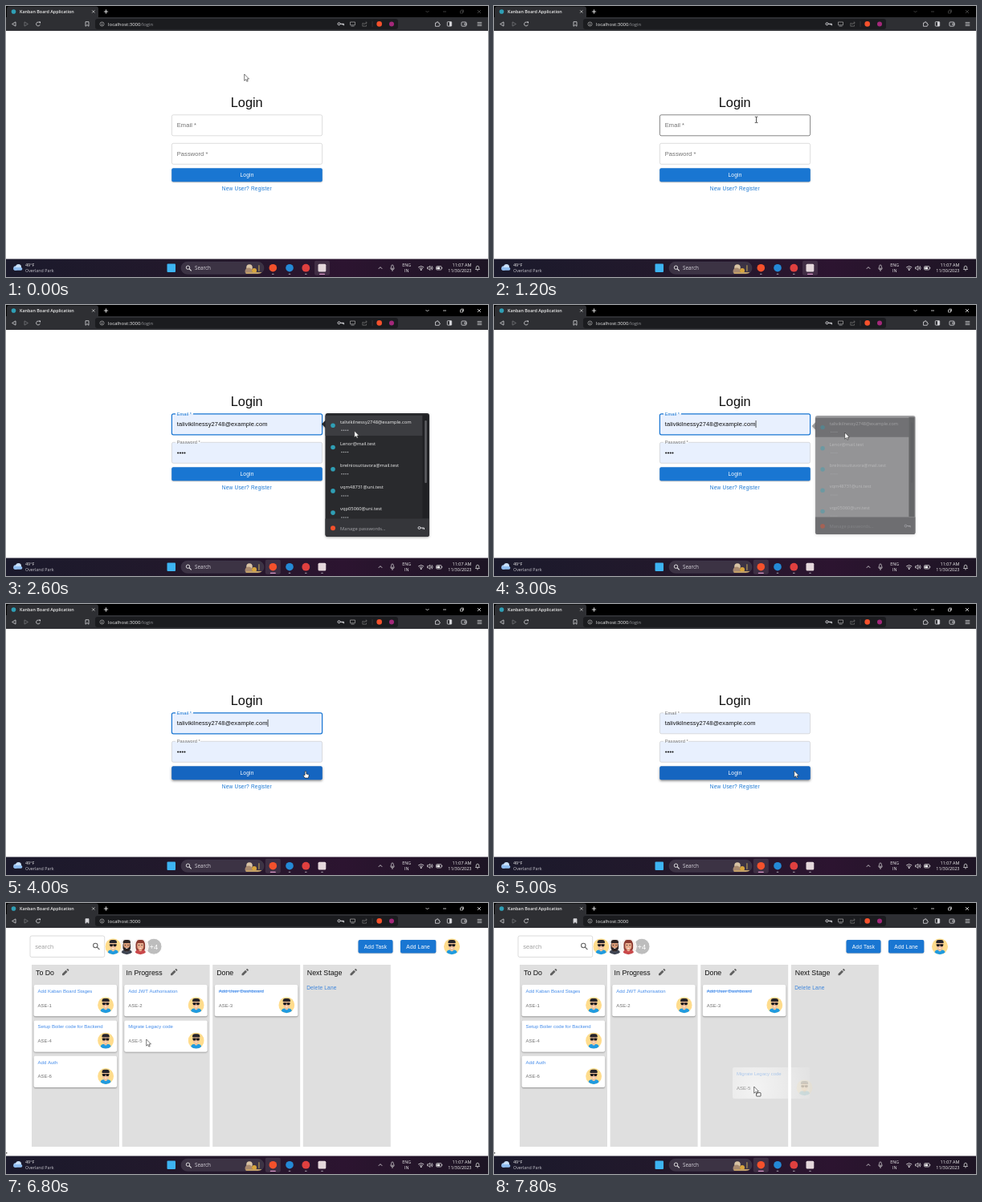
An HTML page with a canvas that plays this animation: 600 by 338 pixels, repeating every 8000 ms.

```html
<!DOCTYPE html>
<html lang="en">
<head>
<meta charset="utf-8">
<title>Kanban Board Application</title>
<style>
html, body { margin: 0; width: 100%; height: 100%; overflow: hidden; background: #fff; }
canvas { display: block; width: 600px; height: 338px; }
</style>
</head>
<body>
<canvas id="stage"></canvas>
<script>
const W = 600, H = 338, LOOP = 8000, STEP = 200;
const canvas = document.getElementById('stage');
const dpr = window.devicePixelRatio || 1;
canvas.width = W * dpr;
canvas.height = H * dpr;
const c = canvas.getContext('2d');

const UI = '"Open Sans", "Noto Sans", sans-serif';
const ARIAL = '"Liberation Sans", Arial, sans-serif';
const BLUE = '#1976d2', ORANGE = '#f4512c', TEAL = '#2f9fb5', LIGHT = '#d6d6da';
const EMAIL = 'talivikilnessy2748@example.com';
const ACCOUNTS = [EMAIL, 'Lenor@mail.test', 'brelniosuttavora@mail.test', 'vqm48731@uni.test', 'vqp05060@uni.test'];

// Moments in the loop, in ms
const FOCUS = 1400, OPEN = 1800, PREVIEW = 2400, FILL = 2800, CLOSED = 3200, SUBMIT = 4800, BOARD = 5200, GRAB = 6800;

// Pointer path: time, x, y
const PATH = [
  [0, 297, 89], [400, 297, 89], [1400, 330, 148], [1800, 382, 150], [2200, 404, 163],
  [2600, 434, 161], [3000, 437, 163], [3200, 436, 166], [3800, 373, 212], [5000, 374, 212],
  [5600, 458, 106], [6600, 175, 174], [6800, 175, 174], [7800, 324, 233], [8000, 324, 233]
];

function pointer(t) {
  const i = PATH.findIndex((p, k) => k && t <= p[0]);
  const a = PATH[i - 1], b = PATH[i];
  const u = (t - a[0]) / (b[0] - a[0]), e = u * u * (3 - 2 * u);
  return [a[1] + (b[1] - a[1]) * e, a[2] + (b[2] - a[2]) * e];
}

function box(x, y, w, h, r, fill, stroke, lw = 0.6) {
  c.beginPath();
  c.roundRect(x, y, w, h, r);
  if (fill) { c.fillStyle = fill; c.fill(); }
  if (stroke) { c.strokeStyle = stroke; c.lineWidth = lw; c.stroke(); }
}

function dot(x, y, r, fill, stroke, lw = 0.8) {
  c.beginPath();
  c.arc(x, y, r, 0, 7);
  if (fill) { c.fillStyle = fill; c.fill(); }
  if (stroke) { c.strokeStyle = stroke; c.lineWidth = lw; c.stroke(); }
}

function shape(d, x, y, fill, stroke, lw = 0.8) {
  const p = new Path2D(d);
  c.save();
  c.translate(x, y);
  if (fill) { c.fillStyle = fill; c.fill(p); }
  if (stroke) { c.strokeStyle = stroke; c.lineWidth = lw; c.stroke(p); }
  c.restore();
}

function text(s, x, y, size, color, { font = ARIAL, weight = 400, align = 'left', gap = 0 } = {}) {
  c.font = `${weight} ${size}px ${font}`;
  c.textAlign = align;
  c.letterSpacing = gap + 'px';
  c.fillStyle = color;
  c.fillText(s, x, y);
  return c.measureText(s).width;
}

const ui = (s, x, y, size, color, opt) => text(s, x, y, size, color, { font: UI, ...opt });

function withShadow(blur, dy, alpha, draw) {
  c.save();
  c.shadowColor = `rgba(0,0,0,${alpha})`;
  c.shadowBlur = blur * dpr;
  c.shadowOffsetY = dy * dpr;
  draw();
  c.restore();
}

function magnifier(x, y, r, color, lw) {
  dot(x, y, r, null, color, lw);
  const k = r * 0.7;
  shape(`M${k} ${k}L${r * 1.9} ${r * 1.9}`, x, y, null, color, lw * 1.2);
}

function keyIcon(x, y) {
  dot(x - 2, y, 1.5, null, LIGHT, 1);
  shape('M-.5 0H4V2M2.4 0V1.6', x, y, null, LIGHT, 1);
}

function chrome(t) {
  const board = t >= BOARD;
  box(0, 0, W, 14.5, 0, '#000');
  box(1, 0.5, 114, 15, [3, 3, 0, 0], '#2e2f33');
  box(0, 14, W, 17, 0, '#2e2f33');
  dot(9.5, 7, 2.8, TEAL);
  ui('Kanban Board Application', 17, 9.2, 5.4, '#eee', { weight: 600 });
  shape('M-1.6-1.6L1.6 1.6M1.6-1.6L-1.6 1.6', 108.8, 7, null, '#ddd', 0.7);
  shape('M-2.6 0H2.6M0-2.6V2.6', 124.5, 7, null, '#eee', 0.9);

  const win = t < FOCUS ? '#4c4c4c' : '#e2e2e2';
  shape('M-2-1L0 1L2-1', 524.5, 7, null, win);
  shape('M-2 0H2', 546, 7, null, win);
  shape('M-2-1H1V2H-2ZM-1-2H2V1', 567.5, 7, null, win, 0.7);
  shape('M-2-2L2 2M2-2L-2 2', 589, 7, null, win);

  shape('M2-2.6L-2.4 0L2 2.6Z', 10, 22.5, null, LIGHT);
  shape('M-2-2.6L2.4 0L-2 2.6Z', 25, 22.5, null, '#77787c');
  c.beginPath();
  c.arc(40, 22.5, 2.4, 0.3, 5.3);
  c.strokeStyle = LIGHT;
  c.lineWidth = 0.8;
  c.stroke();
  shape('M.6-2.9L3-2.9V-.5Z', 40, 22.5, LIGHT);
  shape('M-2-2.8H2V2.8L0 1L-2 2.8Z', 101, 22.5, board ? LIGHT : null, LIGHT);

  box(111, 16, 377, 13, 3, '#1b1c1f');
  dot(119.5, 22.5, 2.5, null, '#bbb', 0.7);
  shape('M0-.5V1.5M0-1.5V-1', 119.5, 22.5, null, '#bbb', 0.7);
  const w = ui('localhost:3000', 127, 24.7, 6, '#f0f0f0');
  if (!board) ui('/login', 127 + w, 24.7, 6, '#96979b');
  keyIcon(416.5, 22.3);
  shape('M-3-2.3H3V1.5H-3ZM-2 2.8H2', 431.5, 22.3, null, '#aaa', 0.7);
  shape('M-1-1H-2.7V2.7H2V1M-1 1Q-.6-1.5 2.6-1.6M1.3-3L2.8-1.6L1.3-.2', 446.5, 22.5, null, '#777', 0.7);
  shape('M0-3.5V3.5', 456, 22.5, null, '#4a4b4f', 0.5);
  dot(464.7, 22.4, 3.3, ORANGE);
  dot(480, 22.5, 3, '#a3287a');
  shape('M-2.5-1.5H-.8Q-.8-3 .2-3Q1-3 1-1.5H2.2V0Q3.5 0 3.5 1Q3.5 1.7 2.2 1.7V2.8H-2.5Z', 537, 22.5, null, LIGHT);
  box(549.3, 19.7, 5.4, 5.4, 0.7, null, LIGHT, 0.8);
  box(552, 19.7, 2.7, 5.4, 0, LIGHT);
  box(567, 20, 6, 5.2, 1, null, LIGHT, 0.8);
  box(570.5, 21.7, 2.7, 1.8, 0.5, null, LIGHT, 0.7);
  shape('M-2.8-2H2.8M-2.8 0H2.8M-2.8 2H2.8', 589.5, 22.5, null, LIGHT);
}

function taskbar(t) {
  const g = c.createLinearGradient(0, 0, W, 0);
  g.addColorStop(0, '#1b1a2c');
  g.addColorStop(0.45, '#24182b');
  g.addColorStop(0.7, '#2c1430');
  g.addColorStop(1, '#1d1524');
  box(0, 315.5, W, 22.5, 0, g);

  dot(12, 327, 2.7, '#a9cdf5');
  dot(15.5, 325.5, 3.5, '#c9e0fa');
  box(9.3, 326, 11, 3.7, 1.8, '#8fbdf0');
  ui('49°F', 24, 325.2, 5.4, '#f2f2f2');
  ui('Overland Park', 24, 332.4, 5.35, '#c4c2ca');

  box(200.5, 321.5, 10.5, 10.5, 1, '#3db4f2');
  box(218, 319.3, 103, 15, 7.5, '#3c3344', '#50475a', 0.4);
  magnifier(226.5, 326.2, 2.2, '#eee', 0.9);
  ui('Search', 235, 329.4, 6.3, '#d8d5dc');
  c.save();
  c.beginPath();
  c.roundRect(296, 319.6, 24.6, 14.4, [3, 7, 7, 3]);
  c.clip();
  dot(303, 326, 3.8, '#d8c3a4');
  dot(302, 331, 4.5, '#a98a70');
  dot(309, 330, 3, '#d8a53d');
  box(299, 332, 20, 2, 0, '#c3a068');
  box(314, 323, 1.8, 8, 1, '#8b7650');
  c.restore();

  const active = t < FOCUS ? 393.5 : 332.3;
  box(active - 9.5, 317.7, 19, 18, 2, 'rgba(255,255,255,.11)');
  dot(332.3, 326.7, 4.8, ORANGE);
  dot(353, 326.7, 4.8, '#2489d6');
  dot(373.3, 326.7, 4.9, '#e0403f');
  box(388.5, 321.7, 9.8, 9.8, 1.5, '#e5d8dc');
  for (const x of [332.3, 353, 373.3, 393.5]) {
    const w = x === active ? 7 : 2.6;
    box(x - w / 2, 333.7, w, 1.3, 0.6, x === active ? '#d895c8' : '#8e8794');
  }

  shape('M-2.2 1L0-1.2L2.2 1', 466, 326.8, null, '#eee');
  box(479.7, 323, 2.6, 5, 1.3, null, '#ddd', 0.7);
  shape('M-2.3-.5Q-2.3 2 0 2Q2.3 2 2.3-.5M0 2V4', 481, 327, null, '#ddd', 0.7);
  ui('ENG', 498.7, 325.2, 5.4, '#f2f2f2', { align: 'center' });
  ui('IN', 498.7, 332.4, 5.4, '#f2f2f2', { align: 'center' });
  shape('M-3.5-1Q0-4 3.5-1M-2.1.7Q0-1.2 2.1.7', 516.7, 327, null, '#eee');
  dot(516.7, 329, 0.9, '#eee');
  shape('M-3-1H-1.5L.4-2.7V2.7L-1.5 1H-3ZM1.6-1.4Q2.6 0 1.6 1.4M2.7-2.5Q4.5 0 2.7 2.5', 527.5, 326.8, null, '#eee', 0.7);
  box(535.5, 324.6, 6.6, 4.4, 1, null, '#eee', 0.7);
  box(536.3, 325.4, 3.8, 2.8, 0.4, '#eee');
  box(542.4, 326, 0.8, 1.6, 0, '#eee');
  ui('11:07 AM', 579.5, 325.2, 5.5, '#f2f2f2', { align: 'right' });
  ui('11/30/2023', 579.5, 332.4, 5.5, '#f2f2f2', { align: 'right' });
  shape('M-2.5 1.5L-1.8.5V-1Q-1.6-2.8 0-2.8Q1.6-2.8 1.8-1V.5L2.5 1.5ZM-.8 2.8H.8', 587, 327, null, '#eee', 0.7);
}

function field(y, label, notch, { focus, hover, filled, raised }) {
  const color = focus ? BLUE : hover ? '#333' : '#c6c6c6';
  box(206.4, y, 187.2, 26, 2, filled ? '#e8f0fe' : null, color, focus ? 1.2 : 0.6);
  if (!raised) {
    text(label, 212.8, y + 15.4, 7.5, '#707070', { gap: 0.07 });
    return;
  }
  box(211, y - 0.8, notch, 1.6, 0, '#fff');
  if (filled) box(211, y + 0.3, notch, 0.6, 0, '#e8f0fe');
  text(label, 212.8, y + 1.8, 5.63, focus ? BLUE : '#707070', { gap: 0.05 });
}

function button(s, x, y, w, h, hover) {
  withShadow(hover ? 3 : 1.5, hover ? 1.4 : 0.7, hover ? 0.45 : 0.3,
    () => box(x, y, w, h, 2, hover ? '#1565c0' : BLUE));
  text(s, x + w / 2, y + h / 2 + 2.3, 6.56, '#fff', { align: 'center', gap: 0.19 });
}

function login(t, [px, py]) {
  const preview = t >= PREVIEW, focus = t >= OPEN && t < SUBMIT;
  const inside = (x, y, w, h) => px > x && px < x + w && py > y && py < y + h;
  text('Login', 299.7, 126.4, 16.3, '#111', { align: 'center' });
  field(135.8, 'Email *', 22, { focus, filled: preview, raised: t >= OPEN, hover: inside(206, 135, 188, 27) });
  field(171.3, 'Password *', 31, { filled: preview, raised: preview, hover: inside(206, 171, 188, 27) });
  let caret = 213.2;
  if (preview) {
    const w = text(EMAIL, 212.8, 151.2, 7.5, '#111', { gap: 0.07 });
    if (t >= FILL) caret = 213 + w;
    for (let i = 0; i < 4; i++) dot(214.2 + i * 2.75, 184.5, 1.05, '#111');
  }
  if (focus && t % 1000 < 500) box(caret, 144, 0.7, 9, 0, '#111');
  button('Login', 206.2, 202.3, 187.6, 17, inside(206, 202, 188, 17));
  text('New User? Register', 299.8, 229.8, 6.56, BLUE, { align: 'center', gap: 0.19 });
  if (t >= OPEN && t < CLOSED) popup(t);
}

function popup(t) {
  const fade = Math.max(0, (t - FILL) / (CLOSED - FILL));
  c.save();
  c.globalAlpha = 1 - fade * 1.2;
  const s = 1 - fade * 0.075;
  c.translate(462, 212);
  c.scale(s, s);
  c.translate(-462, -212);
  withShadow(3, 1, 0.35, () => {
    shape('M0 0L5-5V5Z', 393, 148.5, '#292a2d');
    box(397.5, 135, 129.5, 154, 3, '#292a2d');
  });
  if (t >= PREVIEW) box(397.5, 138, 121, 25, 0, '#3c3d41');
  ACCOUNTS.forEach((name, i) => {
    const y = 147.5 + i * 27.2;
    dot(407, y + 2.8, 2.8, TEAL);
    ui(name, 416, y, 5.8, '#f1f1f1');
    for (let k = 0; k < 4; k++) dot(418 + k * 2.5, y + 8.8, 0.75, '#b5b6ba');
  });
  box(518.5, 137, 7.5, 129, 0, '#202124');
  box(521.2, 144, 2.6, 78, 1, '#5c5d61');
  box(397.5, 266.5, 129.5, 22.5, [0, 0, 3, 3], '#35363a');
  dot(407, 278.3, 3, ORANGE);
  ui('Manage passwords…', 416, 280.5, 5.8, '#a6a7ab');
  keyIcon(516.5, 278);
  c.restore();
}

// kind 0: sunglasses, 1: beard, 2: long hair
function avatar(x, y, kind = 0) {
  const skin = ['#f3c39b', '#d99b77', '#e9ab8d'][kind];
  const hair = ['#26242a', '#2e2423', '#8c3b31'][kind];
  c.save();
  c.beginPath();
  c.arc(x, y, 10, 0, 7);
  c.clip();
  box(x - 10, y - 10, 20, 20, 0, ['#ffdc8c', '#f5f3f2', '#f6efed'][kind]);
  if (kind === 2) box(x - 5.8, y - 8, 11.6, 15, 5.5, hair);
  box(x - 6.5, y + 4.3, 13, 8, 4, ['#1f9be0', '#3f4552', '#c9484a'][kind]);
  box(x - 1.8, y + 2, 3.6, 4, 1.5, skin);
  if (kind === 1) box(x - 4.8, y - 6, 9.6, 12, 4.5, hair);
  box(x - 4, y - 6, 8, kind === 1 ? 8 : 10, 3.8, skin);
  box(x - 4.7, y - 8.3, 9.4, 4.2, [4, 4, 1, 1], hair);
  if (kind) {
    dot(x - 1.8, y - 1.6, 0.7, '#222');
    dot(x + 1.8, y - 1.6, 0.7, '#222');
  } else {
    box(x - 4.5, y - 2.8, 9, 1, 0, '#16161a');
    box(x - 4, y - 2.8, 3.6, 2.8, 1.2, '#16161a');
    box(x + 0.4, y - 2.8, 3.6, 2.8, 1.2, '#16161a');
  }
  box(x - 1.2, y + 1.8, 2.4, 0.7, 0.3, '#fff');
  c.restore();
}

function card(x, y, title, id, done) {
  withShadow(1.8, 0.9, 0.35, () => box(x, y, 103.5, 39.3, 2, '#fff'));
  const w = text(title, x + 5, y + 10, 6, '#438bea');
  if (done) box(x + 5, y + 7.6, w, 0.6, 0, '#438bea');
  text(id, x + 5, y + 27.6, 6, '#707070');
  avatar(x + 89.5, y + 25.2);
}

function ghost(x, y) {
  c.save();
  const g = c.createRadialGradient(x + 28, y + 25, 5, x + 28, y + 25, 75);
  g.addColorStop(0, 'rgba(255,255,255,.6)');
  g.addColorStop(1, 'rgba(255,255,255,.08)');
  box(x, y, 96, 39, 2, g);
  c.globalAlpha = 0.38;
  text('Migrate Legacy code', x + 5, y + 10, 6, '#438bea');
  c.globalAlpha = 0.75;
  text('ASE-5', x + 5, y + 27.6, 6, '#707070');
  c.globalAlpha = 0.14;
  avatar(x + 89.5, y + 25.2);
  c.restore();
}

const LANES = [
  ['To Do', 74, [['Add Kaban Board Stages', 1], ['Setup Boiler code for Backend', 4], ['Add Auth', 6]]],
  ['In Progress', 209, [['Add JWT Authorisation', 2], ['Migrate Legacy code', 5]]],
  ['Done', 297.5, [['Add User Dashboard', 3]]],
  ['Next Stage', 432.5, []]
];

function board(t, [px, py]) {
  const drag = t > GRAB;
  box(30, 41, 92.7, 26.5, 2, null, '#c4c4c4');
  text('search', 36.3, 56.8, 7.5, '#a0a0a0', { gap: 0.07 });
  magnifier(111.3, 53, 2.7, '#666', 1.1);
  dot(184, 54.2, 10, '#bdbdbd', '#fff', 0.9);
  text('+4', 183.8, 57.5, 9.4, '#fff', { align: 'center' });
  for (const [x, kind] of [[167.3, 2], [150.3, 1], [133.3, 0]]) {
    dot(x, 54.2, 10.5, '#fff');
    avatar(x, 54.2, kind);
  }
  button('Add Task', 438.5, 46, 43, 16.4);
  button('Add Lane', 491, 46, 44.3, 16.4);
  avatar(555, 54.2);

  LANES.forEach(([name, pen, cards], i) => {
    const x = 32 + i * 112.6;
    box(x, 77, 109, 227, 0, '#dfdfdf');
    text(name, x + 5, 90, 8.8, '#111');
    shape('M-4 2V4H-2L2.5-.5L.5-2.5ZM1.3-3.2L3.3-1.2L4.2-2.1Q4.6-2.6 4.2-3L3-4.2Q2.6-4.5 2.2-4.1Z', pen, 86.3, '#606060');
    cards.forEach(([title, id], k) => {
      if (id === 5 && drag) return;
      card(x + 2.6, 102 + k * 44.4, title, 'ASE-' + id, id === 3);
    });
  });
  text('Delete Lane', 374.2, 107.6, 6.56, '#3a84dc', { gap: 0.19 });
  box(0, 311, 1.4, 1.4, 0, '#555');
  if (drag) ghost(px - 27, py - 28);
}

function cursor(t, [x, y]) {
  const arrow = 'M0 0V8.2L1.9 6.5L3.2 9.2L4.5 8.6L3.3 6H5.8Z';
  const hand = 'M-1-3Q0-4.2 .8-3V0L3.3.6Q4.2 1 4 2.3L3.3 5H-1L-3 2Q-3 .8-1 1.6Z';
  const overEmail = t < PREVIEW && x > 206 && x < 410 && y > 135.5 && y < 165;
  if (overEmail) {
    shape('M-1.8-3.7H-.5L0-3.3L.5-3.7H1.8M0-3.3V3.3M-1.8 3.7H-.5L0 3.3L.5 3.7H1.8', x, y, null, x > 397 ? '#ddd' : '#222', 0.8);
  } else if (t < SUBMIT && t > CLOSED && y > 202) {
    shape(hand, x, y, '#fff', '#111', 0.6);
  } else {
    if (t > GRAB) box(x + 2.6, y + 3.6, 5.4, 4.4, 0.4, '#fff', '#222', 0.7);
    shape(arrow, x - 0.3, y - 4, '#fff', '#222', 0.6);
  }
}

function draw(t) {
  const p = pointer(t);
  c.setTransform(dpr, 0, 0, dpr, 0, 0);
  box(0, 0, W, H, 0, '#fff');
  (t >= BOARD ? board : login)(t, p);
  chrome(t);
  taskbar(t);
  cursor(t, p);
}

const start = performance.now();
function tick() {
  const t = (performance.now() - start) % LOOP;
  draw(Math.floor(t / STEP) * STEP);
  requestAnimationFrame(tick);
}
tick();
</script>
</body>
</html>
```
